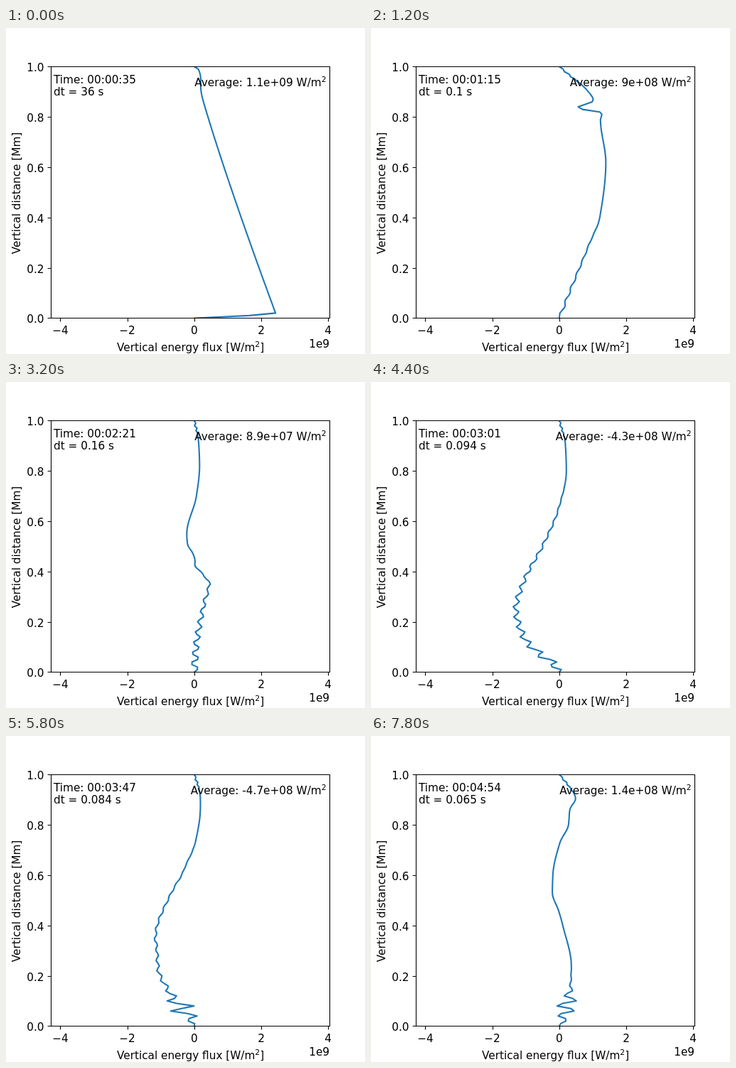
Recreate the animation shown at these times as an HTML page. Size 505 px wide and 459 px high, loop 8 s.

```html
<!DOCTYPE html>
<html lang="en">
<head>
<meta charset="utf-8">
<title>Vertical energy flux</title>
<style>
  html, body { margin: 0; width: 100%; height: 100%; overflow: hidden; background: #fff; }
  svg { display: block; font: 15.28px "DejaVu Sans", sans-serif; }
  .sup { font-size: 10.7px; }
  .mid { text-anchor: middle; }
  .end { text-anchor: end; }
  #axes { fill: none; stroke: #000; stroke-width: 1.1; }
  #curve { fill: none; stroke: #1f77b4; stroke-width: 2.08; stroke-linejoin: round; }
</style>
</head>
<body>
<svg width="505" height="459" viewBox="0 0 505 459">
  <clipPath id="plot"><rect x="63" y="54" width="393" height="355"/></clipPath>
  <path id="curve" clip-path="url(#plot)"/>
  <path id="axes"/>
  <g id="ticks"></g>
  <text class="end" x="455" y="450">1e9</text>
  <text class="mid" x="259.6" y="455">Vertical energy flux [W/m<tspan class="sup" dy="-6">2</tspan><tspan dy="6">]</tspan></text>
  <text class="mid" transform="translate(20 232.5) rotate(-90)">Vertical distance [Mm]</text>
  <text id="time" x="67" y="78"></text>
  <text id="step" x="67" y="95"></text>
  <text class="end" x="450.5" y="82"><tspan id="mean"></tspan><tspan class="sup" dy="-6">2</tspan></text>
</svg>
<script>
const FRAME_MS = 200, FRAMES = 40, ROWS = 100;
const ZERO_X = 264.8, BASE_Y = 408.45, ROW_H = 3.54, UNIT = 47.1;
const $ = id => document.getElementById(id);
const bell = (x, center, width) => Math.exp(-(((x - center) / width) ** 2));

// Cubic interpolation that never overshoots its knots.
function spline(xs, ys, x) {
  let i = 0;
  while (i < xs.length - 2 && x >= xs[i + 1]) i++;
  const secant = j => (ys[j + 1] - ys[j]) / (xs[j + 1] - xs[j]);
  const slope = j => {
    if (j === 0) return secant(0);
    if (j === xs.length - 1) return secant(j - 1);
    const a = secant(j - 1), b = secant(j);
    return a * b > 0 ? 2 * a * b / (a + b) : 0;
  };
  const h = xs[i + 1] - xs[i], t = (x - xs[i]) / h, u = 1 - t;
  return ys[i] * u * u * (1 + 2 * t) + ys[i + 1] * t * t * (3 - 2 * t)
    + h * t * u * (u * slope(i) - t * slope(i + 1));
}

// A smooth profile through a few [row, px] points.
function through(...points) {
  const rows = points.map(p => p[0]), values = points.map(p => p[1]);
  return row => spline(rows, values, row);
}

// A wave that lengthens with height: a fading tail plus a swell near the base,
// and a fine zigzag at the top.
function ripple({ peak, period = 3.75, tail, fade, swell = 0, center = 6, width = 5 }) {
  return row => {
    const amp = tail * Math.max(0, 1 - row / fade) + swell * bell(row, center, width);
    const turns = (row - peak) / (period + 0.0065 * row);
    return amp * Math.cos(2 * Math.PI * turns)
      - 1.3 * Math.cos(Math.PI * row) * bell(row, 98, 4);
  };
}

// Flux profiles at key moments; "front" is the row of the travelling shock.
const states = [
  { frame: 0, front: 98, mean: 1.1e9, dt: 0.1,
    base: row => 117 * (1 - row / ROWS) ** 1.12 * Math.min(1, row * 0.67)
      + 6 * bell(row, 97, 5) },
  { frame: 6, front: 83, mean: 9e8, dt: 0.1,
    base: through([0, 0], [10, 14], [30, 43], [40, 57], [62, 65.5], [79, 58], [81, 60],
      [82, 57], [83.5, 25], [86.5, 48], [91, 38], [96, 17], [100, 0]),
    wave: ripple({ peak: 4.5, period: 5.2, tail: 2, fade: 40 }) },
  { frame: 16, front: 44, mean: 8.9e7, dt: 0.16,
    base: through([0, 0], [10, 2.5], [28, 14.5], [35, 21], [43, 1], [46, 0], [51, -9.5],
      [55, -10.5], [70, 3], [82, 7.5], [92, 6], [100, 0]),
    wave: ripple({ peak: 1.5, period: 4, tail: 6, fade: 50 }) },
  { frame: 22, front: 8, mean: -4.3e8, dt: 0.094,
    base: through([0, 0], [3, -7], [8, -31], [14, -50], [25, -61], [36, -50], [51, -22],
      [65, -1], [80, 10], [91, 8.5], [100, 0]),
    wave: ripple({ peak: 4.3, tail: 6, fade: 75, swell: 3 }) },
  { frame: 26, front: 11, mean: -6e8, dt: 0.081,
    base: through([0, 0], [4, -16], [14, -60], [22, -81], [32, -74], [52, -38], [66, -4],
      [74, 9.5], [82, 14], [91, 9], [100, 0]),
    wave: ripple({ peak: 1, tail: 5, fade: 75, swell: 20 }) },
  { frame: 33, front: 10, mean: -1.6e8, dt: 0.088,
    base: through([0, 3], [16, 8], [24, 1], [30, -8], [36, -23], [42, -29], [63, -15.5],
      [79, -5.5], [94, 9], [100, 0]),
    wave: ripple({ peak: 3, period: 3.95, tail: 4, fade: 25, swell: 25, center: 4.5, width: 4 }) },
  { frame: 39, front: 12, mean: 1.4e8, dt: 0.065,
    base: through([0, 3], [16, 16], [24, 17], [40, 5], [46, -1], [53, -9.7], [60, -9],
      [73, 1], [80, 13], [86, 14.8], [90.5, 23], [96, 12], [100, 0]),
    wave: ripple({ peak: 2.3, period: 3.95, tail: 2, fade: 25, swell: 14, center: 8 }) }
];

// The flux vanishes on both boundaries.
function flux({ base, wave = () => 0 }, row) {
  return (base(row) + wave(row)) * Math.min(1, row, ROWS - row);
}

const frames = states.map(s => s.frame);
const track = (key, n) => spline(frames, states.map(s => s[key]), n);

// The profiles are stretched so that their fronts coincide before blending.
function curvePath(n) {
  const front = track("front", n);
  const points = [];
  for (let row = 0; row <= ROWS; row++) {
    const values = states.map(s => flux(s, row < front
      ? row * s.front / front
      : ROWS - (ROWS - row) * (ROWS - s.front) / (ROWS - front)));
    const x = ZERO_X + spline(frames, values, n);
    points.push(x.toFixed(2) + " " + (BASE_Y - row * ROW_H).toFixed(2));
  }
  return "M" + points.join("L");
}

const pad = v => String(v).padStart(2, "0");
const clock = s => `00:${pad(Math.floor(s / 60))}:${pad(s % 60)}`;
const scientific = v => v.toExponential(1).replace(".0e", "e").replace(/(\d)$/, "0$1");

function drawAxes() {
  let d = "M63.5 54.5H455.5V408.5H63.5Z", labels = "";
  for (let v = -4; v <= 4; v += 2) {
    const x = ZERO_X + v * UNIT;
    d += `M${Math.round(x) + 0.5} 408.5v4.9`;
    labels += `<text class="mid" x="${x}" y="431">${String(v).replace("-", "\u2212")}</text>`;
  }
  for (let i = 0; i <= 5; i++) {
    const y = Math.round(BASE_Y - i * 20 * ROW_H) + 0.5;
    d += `M63.5 ${y}h-4.9`;
    labels += `<text class="end" x="53.5" y="${y + 6}">${(i / 5).toFixed(1)}</text>`;
  }
  $("axes").setAttribute("d", d);
  $("ticks").innerHTML = labels;
}

let shown = -1;
function tick() {
  const n = Math.floor(performance.now() / FRAME_MS) % FRAMES;
  if (n !== shown) {
    shown = n;
    const dt = n ? Number(track("dt", n).toPrecision(2)) : 36;
    $("curve").setAttribute("d", curvePath(n));
    $("time").textContent = "Time: " + clock(Math.floor(35.3 + 6.64 * n));
    $("step").textContent = `dt = ${dt} s`;
    $("mean").textContent = `Average: ${scientific(track("mean", n))} W/m`;
  }
  requestAnimationFrame(tick);
}

drawAxes();
tick();
</script>
</body>
</html>
```
